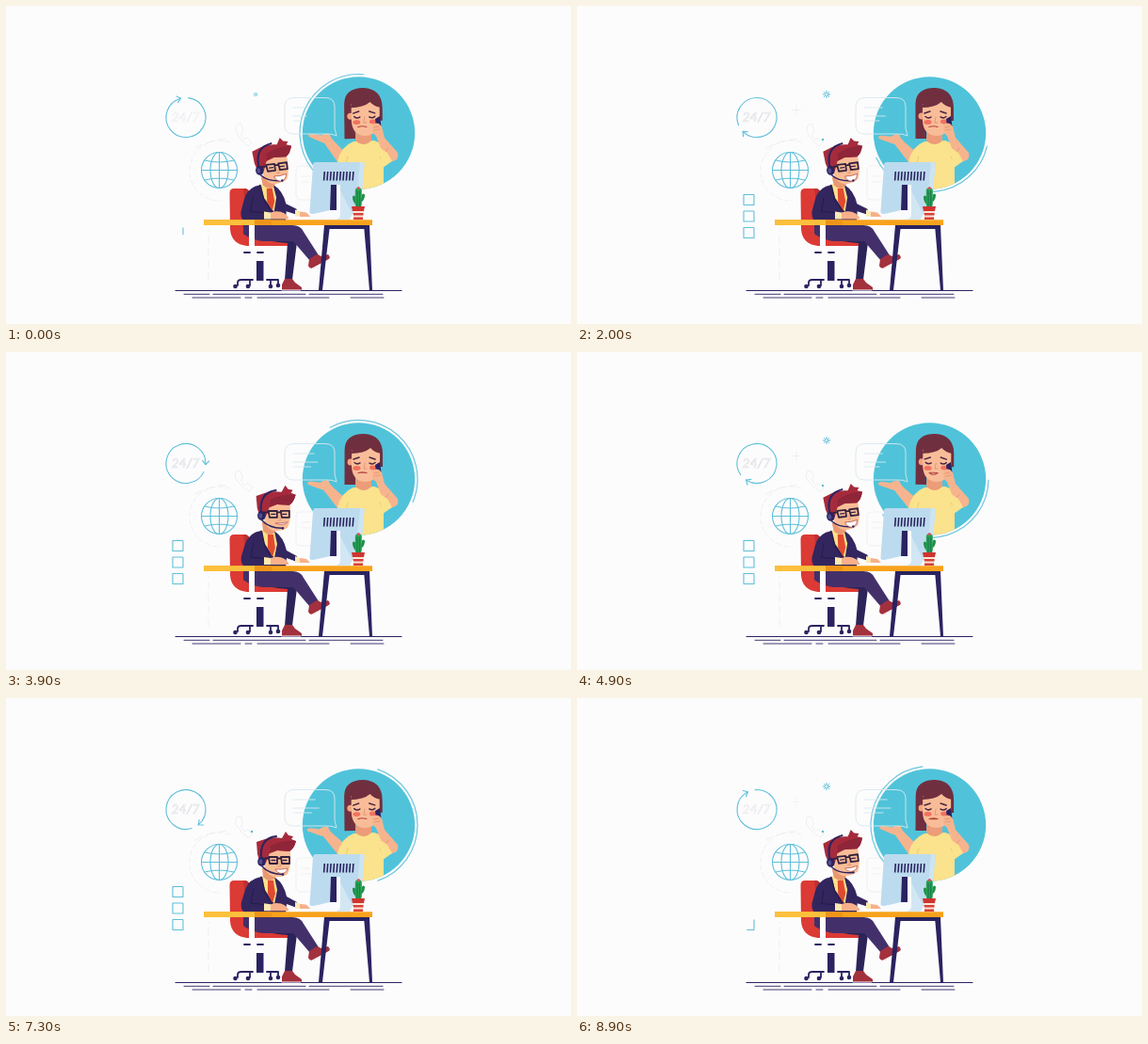
An HTML page for the animation above (9000 ms loop, 600 by 338 pixels).

```html
<!DOCTYPE html>
<html lang="en">
<head>
<meta charset="utf-8">
<title>Support desk</title>
<style>
html, body { margin: 0; width: 100%; height: 100%; overflow: hidden; background: #fdfcfd; }
svg { display: block; width: 100vw; height: 100vh; }
.line { fill: none; stroke-linecap: round; stroke-linejoin: round; }
.teal { stroke: #5fbfd9; stroke-width: 1.1; }
.faint { stroke: #ebebee; stroke-width: .8; }
.navy { stroke: #2a2360; }
</style>
</head>
<body>
<svg viewBox="0 0 600 338" xmlns="http://www.w3.org/2000/svg">
  <defs><clipPath id="disc"><circle cx="374.5" cy="135" r="59.7"/></clipPath></defs>

  <!-- background doodles -->
  <g class="line faint">
    <path stroke-dasharray="5 3" d="M238 145A32 32 0 1 0 228 207"/>
    <path stroke-dasharray="8 5" d="M215 291V238M201 151Q220 140 238 142"/>
    <path id="phone" d="M246 126q-4 4 0 11t11 12l4-4-5-5-3 2q-4-4-3-7l2-2-2-7z"/>
    <path id="plus" d="M233 106v9M228.500 110.500h9"/>
    <path d="M330 170h-17q-5 0-5 5v26q0 5 5 5h12M314 181h9M314 187h9"/>
  </g>
  <text id="hours" x="190.500" y="123" text-anchor="middle" font-family="Lato, sans-serif" font-size="14" font-style="italic" fill="none" stroke="#dcdee3" stroke-width=".6">24/7</text>
  <g class="line teal">
    <path id="ring"/>
    <path id="tip" d="M-4-3.500L0 0L-4 3.500"/>
    <g id="boxes"></g>
    <circle cx="226.500" cy="174.500" r="19"/>
    <ellipse cx="226.500" cy="174.500" rx="9.500" ry="19"/>
    <path d="M226.500 155.500v38M207.500 174.500h38M211 164Q226.500 168 242 164M211 185Q226.500 181 242 185"/>
    <g id="sun"><circle r="2.200"/><path id="rays"/></g>
  </g>
  <circle id="dot" r="1.200" fill="#58c0cf"/>

  <!-- caller -->
  <path id="orbit" class="line" stroke="#6cc6dc" stroke-width="1.200"/>
  <circle cx="374.500" cy="135" r="59.700" fill="#50c3da"/>
  <g clip-path="url(#disc)">
    <path id="palm" fill="#f6b48e" d="M353 167L337 147Q330 145 320 141Q319 138 324 138L333 139Q338 136 342 137L344 141L348 145L363 158Z"/>
    <path d="M352 165Q356 149 369 144L391 143Q402 146 408 158L401 168V198H358L360 171L354 175Z" fill="#fbe28c"/>
    <path d="M360 171L363 160M401 168L397 160" class="line" stroke="#eacb6c"/>
    <path d="M372 132H388V143Q380 151 371 143Z" fill="#ec9c78"/>
    <g id="caller">
      <path d="M359.500 141V104Q360 87 380 87Q400 88 400 109V122H390V120H371V141Z" fill="#702f3f"/>
      <circle cx="366" cy="117" r="3.500" fill="#f0a580"/>
      <path d="M367 104Q379 107 387 101Q391 106 397 107V122Q395 138 381 138Q368 137 367 122Z" fill="#f8bd98"/>
      <path d="M366 108Q380 108 387 102Q391 107 399 108V102Q388 91 370 98Z" fill="#702f3f"/>
      <ellipse cx="372.500" cy="123.500" rx="4" ry="2.400" fill="#f4705f"/>
      <ellipse cx="390" cy="123" rx="4" ry="2.400" fill="#f4705f"/>
      <path class="line" stroke="#4a2340" stroke-width="1.500" d="M369 114L375 112M386 112L392 114M370 117.500Q373 120 376 118M386 118Q389 120 392 117.500"/>
      <path class="line" stroke="#e99373" d="M381 118L380 124L383 124"/>
      <path id="callerMouth" class="line" stroke="#b8433f" stroke-width="1.200" style="fill:#fff"/>
    </g>
    <path d="M392 120L397 117L399 132L394 137Z" fill="#2a2360"/>
    <path d="M389 128Q391 123 396 125L399 128L402 140L416 156Q418 163 411 165Q405 166 401 159L393 138Q388 135 389 128Z" fill="#f6b48e"/>
    <path class="line" stroke="#e79a77" d="M391 129L396 128M391 132L397 131M401 158L406 151"/>
    <path d="M396 150L405 156L410 165L400 172Z" fill="#fbe28c"/>
  </g>
  <g class="line" stroke="#d8e8ec" stroke-width=".9">
    <path d="M305 97.500H339Q349 97.500 349 107V130L351 138Q347 135.500 339 136H305Q296 135.500 296 127V107Q296 98 305 97.500Z"/>
    <path id="words"/>
  </g>

  <!-- floor -->
  <path class="line navy" stroke-width="1.100" d="M180 302.500H420"/>
  <path class="line navy" stroke-width=".9" d="M189 306.300H216M220 306.300H318M322 306.300H400M198 310H249M254 310H261M267 310H343M366 310H401"/>

  <!-- chair -->
  <path d="M237.500 199Q237.500 194 242 194H254Q259 195 259.500 201L261 236Q263 247 273 247H298Q303 248 300 255H256Q239 253 238 237Z" fill="#dc3a34"/>
  <path d="M252 194H254Q259 195 259.500 201L261 236Q263 247 273 247H279V250H271Q259 249 257 236Z" fill="#bd3032"/>
  <path d="M266 271H273.500V292H266Z" fill="#2a2360"/>
  <path class="line navy" stroke-width="1.800" d="M253 262H259M267 262H273M246 297V294Q246 291 250 291H262M259 297V292M277 291H289V297M281 297V292"/>
  <g fill="#2a2360"><circle cx="243.500" cy="298" r="2.300"/><circle cx="257" cy="298" r="2.300"/><circle cx="281" cy="298" r="2.300"/><circle cx="289" cy="297" r="2.300"/></g>

  <!-- legs and shoes -->
  <path d="M283 236H308L309 251L304 291H296L299 252Q276 250 270 246Z" fill="#2c2459"/>
  <path d="M252 233H304Q313 233 316 240L332 265L323 271L305 250H273Q259 248 252 242Z" fill="#43306a"/>
  <path d="M296 290H304L307 294L314 299V302H293V296Z" fill="#a3303d"/>
  <path d="M322 269L330 264L335 266L342 264Q345 267 343 269L326 279Q322 279 321 276Z" fill="#a3303d"/>
  <path class="line" stroke="#fff" d="M293 302H313M325 279L344 269"/>
  <path d="M258 232H264V261Q258 261 258 253Z" fill="#fff"/>

  <!-- agent -->
  <g id="torso">
    <path d="M271 190Q258 192 254 204L250 217Q248 228 258 229H297L298 219L309 223V217L298 211Q295 197 286 191Z" fill="#33265f"/>
    <path d="M272 189L285 190L288 204L285 219L275 204Z" fill="#fbe08a"/>
    <path d="M278 194H284L286 208L283 218L278 208Z" fill="#e24a2f"/>
    <path class="line" stroke="#241b48" d="M271 190L275 207L285 222M263 203L260 218L278 220"/>
  </g>

  <!-- desk -->
  <path class="navy" stroke-width="4" d="M340 235H385"/>
  <path d="M338 233H344L336 302H332ZM380 233H386L389 302H386Z" fill="#2a2360"/>
  <path d="M210 227.200H389V233H210Z" fill="#f9a21c"/>
  <path d="M210 227.200H264V233H210Z" fill="#fcc03c"/>
  <path d="M264 227.200H282V233H264Z" fill="#ee9418"/>

  <!-- hands -->
  <g id="nearHand">
    <path d="M274 219L281 220V227H274Z" fill="#fbe9b3"/>
    <path d="M281 220Q289 217 296 221L300 225V227H281Z" fill="#f7b08a"/>
  </g>
  <g id="farHand">
    <path d="M307 217L312 219V224H307Z" fill="#fbe9b3"/>
    <path d="M312 219L319 220L324 225H312Z" fill="#f7b08a"/>
  </g>
  <path d="M299 227L304 224H332V227Z" fill="#fff"/>

  <!-- monitor -->
  <path d="M329 166H378Q381 166 380.500 169L376 218Q376 221 373 221H325Q322 221 322.500 218L326 169Q326 166 329 166Z" fill="#bddbee"/>
  <path d="M376 166H378Q381 166 380.500 169L376 218Q376 221 373 221H371Z" fill="#cde4f3"/>
  <path class="navy" fill="none" stroke-width="1.600" id="vents"/>
  <path d="M345 190H351V218H344Z" fill="#2a2360"/>
  <path d="M351 190H355V221Q355 227 348 227H321Q322 221 331 220L344 217H351Z" fill="#f9fbff"/>
  <path d="M355 196V221Q355 227 348 227H365L368 221Z" fill="#d3e6f3"/>

  <!-- cactus -->
  <path class="line" stroke="#1f8f48" stroke-width="3" d="M374 210Q369.500 209 369.500 203M374 208Q379.500 207 379.500 201"/>
  <rect x="370.800" y="193" width="7" height="21" rx="3.500" fill="#27a351"/>
  <path class="line" stroke="#12694a" stroke-width=".8" d="M373 197V213M375.700 197V213"/>
  <circle cx="374.300" cy="193.500" r="1.500" fill="#e84d67"/>
  <path d="M367 213H381L380 218H368Z" fill="#d0342f"/>
  <path d="M368 218H380L379 227H369Z" fill="#f7e7d8"/>
  <path d="M368.500 220H379.500V222.500H369ZM369 224.500H379V227H369Z" fill="#d8413a"/>

  <!-- head -->
  <g id="head">
    <path d="M272 181H286V191Q280 198 273 190Z" fill="#e99872"/>
    <path d="M275 162H302Q303 180 299 187Q293 191 284 190Q275 187 274 176Z" fill="#f9bd96"/>
    <path d="M267 166L266 153L275 150Q283 147 293 149L297 142L300 146L305 147L303 150L308 152Q306 160 301 163L288 162L280 165L276 175L269 173Z" fill="#a52b3c"/>
    <path d="M281 157Q293 151 308 152Q306 160 301 163L288 162L280 165Z" fill="#8f2539"/>
    <path class="line navy" stroke-width="2" d="M271 171Q269 149 287 147"/>
    <path class="line navy" stroke-width="1.500" d="M272 179Q279 187 293 187.500"/>
    <ellipse cx="271.500" cy="174" rx="4.300" ry="5" fill="#2a2360"/>
    <ellipse cx="270.500" cy="174" rx="1.900" ry="2.800" fill="#544d91"/>
    <path class="line" stroke="#32203f" stroke-width="1.800" d="M275 170.500H279M279 169H288V176H280ZM288 170.500H292M292 169H301V176H293Z"/>
    <path class="line" stroke="#32203f" stroke-width="1.300" d="M282 172.500H286M294 172.500H298"/>
    <path class="line" stroke="#e79873" d="M290 175L292 179H289"/>
    <path id="grin" fill="#fff" stroke="#b14a45" stroke-width=".7"/>
    <circle cx="294" cy="187.500" r="1.300" fill="#2a2360"/>
  </g>
</svg>
<script>
const $ = id => document.getElementById(id);
const LOOP = 9000, BEAT = 3, STEP = 100;

const set = (id, name, value) => $(id).setAttribute(name, value);
const clamp = x => Math.min(1, Math.max(0, x));
const ease = x => { x = clamp(x); return x * x * (3 - 2 * x); };
const polar = (cx, cy, r, deg) => {
  const a = deg * Math.PI / 180;
  return [cx + r * Math.sin(a), cy - r * Math.cos(a)];
};

// Angles run clockwise from the top.
function arc(cx, cy, r, from, to) {
  const [x0, y0] = polar(cx, cy, r, from), [x1, y1] = polar(cx, cy, r, to);
  return `M${x0} ${y0}A${r} ${r} 0 ${to - from > 180 ? 1 : 0} 1 ${x1} ${y1}`;
}

// Smooth interpolation through [time, value] pairs.
function keyed(t, keys) {
  const i = keys.findIndex(k => k[0] > t);
  if (i < 0) return keys[keys.length - 1][1];
  const [t0, v0] = keys[i - 1], [t1, v1] = keys[i];
  return v0 + (v1 - v0) * ease((t - t0) / (t1 - t0));
}

const boxes = [200.5, 218, 235.5].map(y => {
  const box = document.createElementNS("http://www.w3.org/2000/svg", "path");
  box.setAttribute("d", `M188 ${y}h-11v11h11v-11`);
  box.setAttribute("pathLength", 1);
  box.setAttribute("stroke-linecap", "butt");
  $("boxes").append(box);
  return box;
});

set("vents", "d", Array.from({ length: 10 }, (_, i) => `M${338.3 + i * 3.4} 176l-.7 9.500`).join(""));
set("rays", "d", Array.from({ length: 8 }, (_, i) =>
  `M${polar(0, 0, 3, i * 45)}L${polar(0, 0, 4.2, i * 45)}`).join(""));

// Each box is drawn on, then erased from its start; the last erase runs past the beat.
function trimBox(box, i, p) {
  const wrapped = p < 0.1 ? p + BEAT : p;
  const start = clamp((wrapped - 2.27 - i * 0.2) / 0.4);
  const end = clamp((wrapped - 0.065 - i * 0.2) / 0.4);
  const length = end - start;
  box.setAttribute("stroke-dasharray", `${length} 2`);
  box.setAttribute("stroke-dashoffset", -start);
  box.setAttribute("visibility", length > 0.001 ? "visible" : "hidden");
}

function render(ms) {
  const t = Math.floor(ms % LOOP / STEP) * STEP / 1000;
  const p = t % BEAT;
  const wave = Math.cos(p / BEAT * 2 * Math.PI);
  const turn = p * 120;

  const tipAngle = turn - 15;
  set("ring", "d", arc(191, 118.5, 21, tipAngle - 338, tipAngle));
  set("tip", "transform", `translate(${polar(191, 118.5, 21, tipAngle)}) rotate(${tipAngle})`);
  set("orbit", "d", arc(374.5, 135, 62.5, turn - 137, turn + 5));
  boxes.forEach((box, i) => trimBox(box, i, p));

  const sun = keyed(p, [[0, .5], [.2, 0], [.9, 0], [1.1, .25], [1.3, 0], [1.8, .85], [2.3, 1], [2.9, .9], [3, .5]]);
  set("sun", "transform", `translate(265 94) scale(${sun})`);
  set("sun", "opacity", sun ? 1 : 0);
  set("plus", "opacity", keyed(p, [[0, 0], [1.4, 0], [1.9, 1], [2.8, 1], [3, 0]]));
  set("phone", "transform", `rotate(${8 * Math.sin(p * 4 * Math.PI)} 252 137)`);
  set("hours", "opacity", keyed(p, [[0, .5], [.2, .5], [.9, 1], [2.7, 1], [3, .5]]));
  const dotX = keyed(p, [[0, 279], [1.1, 279], [1.3, 261], [3, 261]]);
  set("dot", "transform", `translate(${dotX} 142)`);
  set("dot", "opacity", keyed(p, [[0, 0], [.9, 0], [1.1, 1], [2.9, 1], [3, 0]]));

  const reach = keyed(p, [[0, .5], [.2, .4], [1.1, 1], [2, .8], [2.9, 1], [3, .5]]);
  set("words", "d", [[108, 24], [117, 28], [122, 20]].map(([y, w]) => `M305 ${y}h${w * reach}`).join(""));

  const lean = keyed(p, [[0, -7], [.4, -7], [1, 0], [1.35, 0], [1.8, -7], [3, -7]]);
  set("head", "transform", `rotate(${lean} 277 192)`);
  set("torso", "transform", `rotate(${lean * .3} 275 228)`);
  const smile = keyed(p, [[0, 1], [.2, .85], [1.1, .15], [1.3, .75], [1.9, 1], [2.9, .7], [3, 1]]);
  set("grin", "d", `M286 182Q292 ${182 + smile} 299 181Q298 ${182 + 6 * smile} 292 ${182 + 6 * smile}Q287 ${182 + 5 * smile} 286 182Z`);
  const tap = Math.sin(p * 4 * Math.PI);
  set("nearHand", "transform", `translate(0 ${-.5 + .5 * tap})`);
  set("farHand", "transform", `translate(0 ${-.5 - .5 * tap})`);

  set("palm", "transform", `rotate(${1.5 + 2 * wave} 357 163)`);
  const cheer = keyed(t, [[0, -1], [1.1, .3], [2.9, -.6], [4.9, 1], [6.2, 1], [7.3, -1], [8.9, .4], [9, -1]]);
  set("caller", "transform", `rotate(${.6 * cheer} 380 140)`);
  const gape = Math.max(0, cheer);
  set("callerMouth", "d", `M374 128.500Q378.500 ${127 + gape} 383 128.500Q378.500 ${127 + 5 * gape} 374 128.500Z`);
}

const began = performance.now();
function tick(now) {
  render(Math.max(0, now - began));
  requestAnimationFrame(tick);
}
render(0);
requestAnimationFrame(tick);
</script>
</body>
</html>
```
